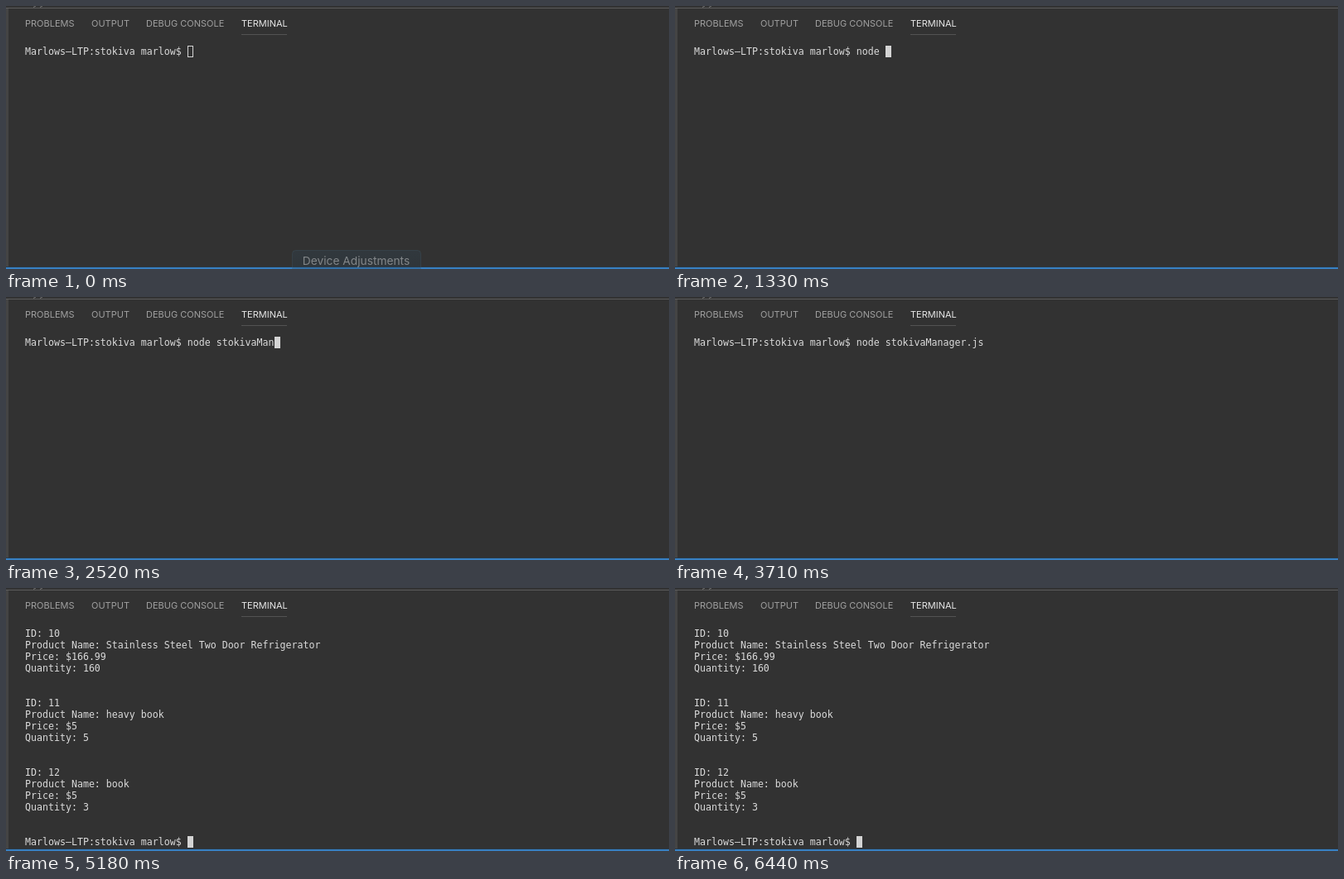
These frames come from a looping animation (800x318 px, 6.72 s). An HTML page with a canvas:

```html
<!DOCTYPE html>
<html lang="en">
<head>
<meta charset="utf-8">
<title>Terminal session</title>
<style>
html, body { margin: 0; height: 100%; overflow: hidden; background: #323232; }
canvas { display: block; }
</style>
</head>
<body>
<canvas id="stage" width="800" height="318"></canvas>
<script>
const ctx = document.getElementById('stage').getContext('2d');
const LOOP = 6720, LEFT = 23, TOP = 48, COL = 7, ROW = 14;
const MONO = '11.628px "DejaVu Sans Mono", monospace';
const UI = 'Inter, sans-serif';
const INK = '#dadada', GREEN = '#18b57c', CYAN = '#27b3d6';

const PROMPT = 'Marlows–LTP:stokiva marlow$ ';
const COMMAND = 'node stokivaManager.js ';
// Time at which each typed character appears
const KEYS = [840, 980, 1050, 1190, 1330, 1470, 1610, 1680, 1820, 1890, 2030, 2100, 2240, 2380, 2520];
const FOCUS = 770, COMPLETE = 2660, ENTER = 2940, LOADED = 3710, MENU = 3780,
      CHOSEN = 4550, NEWLINE = 4620, RESULT = 4690, HOVER = 6020, FADE = 420;
const CHOICES = ['View Products for Sale', 'View Low Inventory', 'Add to Inventory', 'Add New Product'];
const PRODUCTS = [
  [10, 'Stainless Steel Two Door Refrigerator', '$166.99', 160],
  [11, 'heavy book', '$5', 5],
  [12, 'book', '$5', 3]
];

function rect(x, y, w, h, color) {
  ctx.fillStyle = color;
  ctx.fillRect(x, y, w, h);
}

function print(row, col, text, color = INK, bold = false) {
  ctx.font = (bold ? 'bold ' : '') + MONO;
  ctx.fillStyle = color;
  ctx.fillText(text, LEFT + col * COL, TOP + row * ROW + 11);
}

function cursor(row, col, filled = true) {
  const x = LEFT + col * COL, y = TOP + row * ROW;
  if (filled) return rect(x, y, COL, ROW, '#d4d4d4');
  ctx.strokeStyle = '#d4d4d4';
  ctx.lineWidth = 1;
  ctx.strokeRect(x + .5, y + .5, COL - 1, ROW - 1);
}

function drawPanel() {
  rect(0, 0, 800, 318, '#323232');
  rect(0, 2, 800, 1, '#5c5c5c');
  rect(0, 3, 3, 313, '#444444');
  ctx.strokeStyle = '#777777';
  ctx.lineWidth = 1;
  ctx.beginPath();
  for (const x of [33, 41]) {
    ctx.moveTo(x, 1.5);
    ctx.lineTo(x + 3, 0);
  }
  ctx.stroke();
  rect(0, 315, 800, 1, '#2b3a48');
  rect(0, 316, 800, 2, '#3880c2');

  ctx.font = '11px ' + UI;
  const tabs = [['PROBLEMS', 23], ['OUTPUT', 103], ['DEBUG CONSOLE', 169], ['TERMINAL', 284]];
  for (const [label, x] of tabs) {
    ctx.fillStyle = x === 284 ? '#e7e7e7' : '#a0a0a0';
    ctx.fillText(label, x, 25);
  }
  rect(284, 34, 55, 1, '#535353');
}

function drawCommand(t) {
  const typed = t >= COMPLETE ? COMMAND.length : KEYS.filter(k => k <= t).length;
  print(0, 0, PROMPT + COMMAND.slice(0, typed));
  if (t < ENTER) cursor(0, PROMPT.length + typed, t >= FOCUS);
  else if (t < LOADED) cursor(1, 0);
}

function drawMenu(t) {
  print(1, 0, '?', GREEN);
  print(1, 2, 'selection:', INK, true);
  if (t >= CHOSEN) {
    print(1, 13, CHOICES[0], CYAN);
    if (t >= NEWLINE) cursor(2, 0);
    return;
  }
  print(1, 13, '(Use arrow keys)');
  CHOICES.forEach((choice, i) => print(2 + i, 0, (i ? '  ' : '❯ ') + choice, i ? INK : CYAN));
}

function drawResult() {
  PRODUCTS.forEach(([id, name, price, count], i) => {
    const lines = ['ID: ' + id, 'Product Name: ' + name, 'Price: ' + price, 'Quantity: ' + count];
    lines.forEach((line, j) => print(i * 6 + j, 0, line));
  });
  print(18, 0, PROMPT);
  cursor(18, PROMPT.length);
}

function drawTooltip(alpha) {
  if (alpha <= 0) return;
  const fill = ctx.createLinearGradient(0, 295, 0, 318);
  fill.addColorStop(0, '#304b60');
  fill.addColorStop(1, '#263f50');
  ctx.beginPath();
  ctx.roundRect(345.5, 295.5, 155, 26, 4);
  // The box fades faster than its label
  ctx.globalAlpha = alpha ** 1.5;
  ctx.fillStyle = fill;
  ctx.fill();
  ctx.strokeStyle = '#456177';
  ctx.lineWidth = 1;
  ctx.stroke();
  ctx.globalAlpha = alpha;
  ctx.font = '13.75px ' + UI;
  ctx.textAlign = 'center';
  ctx.fillStyle = '#ffffff';
  ctx.fillText('Device Adjustments', 422.5, 312.5);
  ctx.textAlign = 'left';
  ctx.globalAlpha = 1;
}

function draw(now) {
  const t = now % LOOP;
  drawPanel();
  if (t < RESULT) drawCommand(t);
  else drawResult();
  if (t >= MENU && t < RESULT) drawMenu(t);
  const step = Math.floor(t / 70) * 70;
  drawTooltip(step < HOVER ? .4 * (1 - step / 280) : 1 - (step - HOVER) / FADE);
}

let start;
function tick(now) {
  start ??= now;
  draw(now - start);
  requestAnimationFrame(tick);
}
requestAnimationFrame(tick);
</script>
</body>
</html>
```
